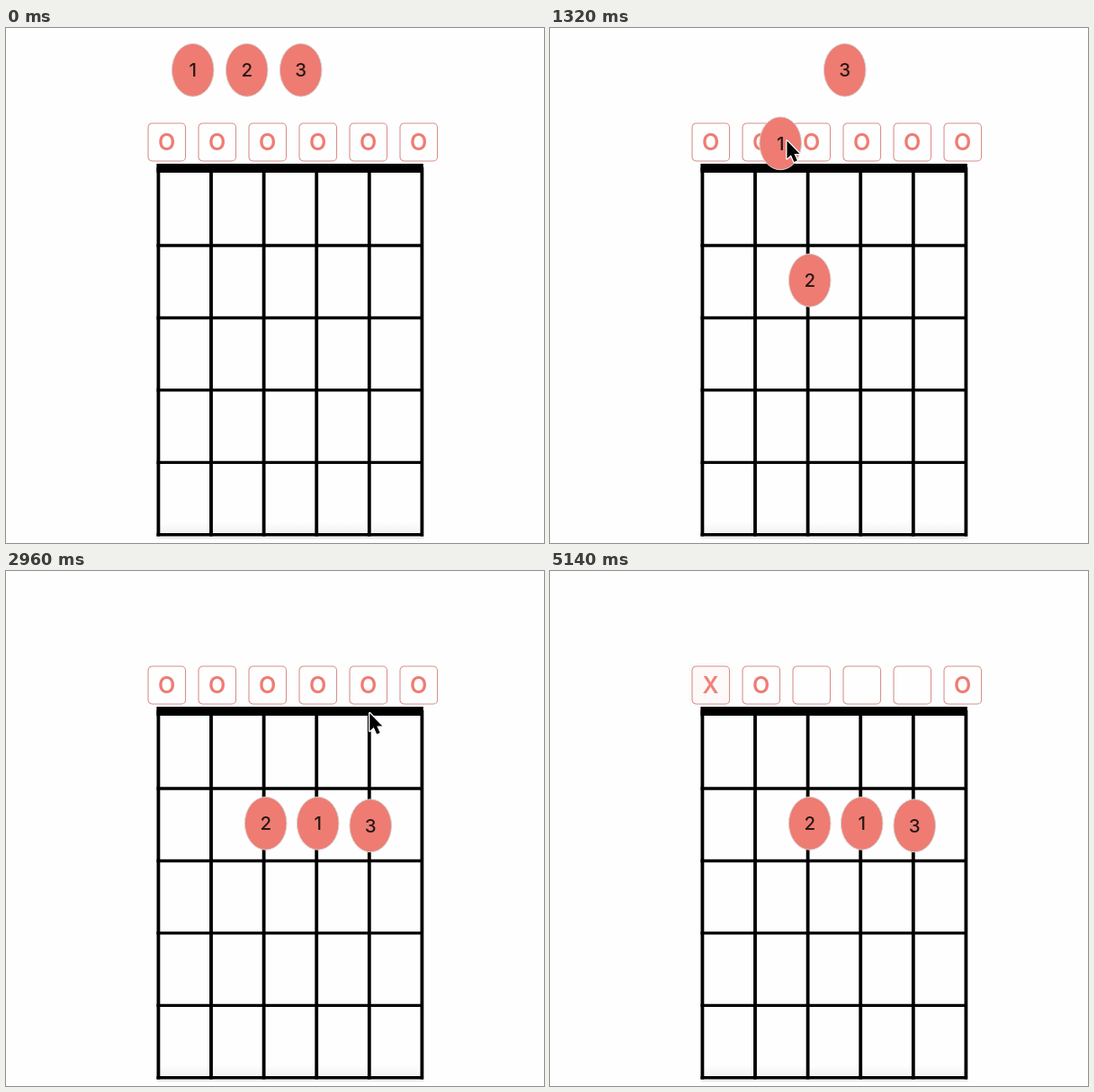
Animation of 598 by 573 pixels, one loop 5.18 s. Source, as an HTML page:

```html
<!DOCTYPE html>
<html lang="en">
<head>
<meta charset="utf-8">
<title>Chord builder</title>
<style>
  html, body { margin: 0; width: 100%; height: 100%; overflow: hidden; background: #fefefe; }
  svg { display: block; width: 598px; height: 573px; }
  text { font-family: Inter, "Liberation Sans", sans-serif; font-weight: 500; text-anchor: middle; }
  .line { stroke: #000; fill: none; }
  .box { stroke: #d8928b; stroke-width: 1.1; }
  .ring { fill: #8fcb9f; }
  .mark { font-size: 25px; font-weight: 600; }
  .dot { fill: #ee7c73; stroke: #d8d0ce; stroke-width: 1; }
  .num { font-size: 20.5px; fill: #2a1817; }
  .arrow { stroke: #fff; stroke-width: 3; stroke-linejoin: round; paint-order: stroke; }
</style>
</head>
<body>
<svg viewBox="0 0 598 573">
  <defs>
    <linearGradient id="shade" x2="0" y2="1">
      <stop stop-color="#fefefe"/><stop offset="1" stop-color="#f1f1f1"/>
    </linearGradient>
  </defs>
  <g id="buttons"></g>
  <rect x="169" y="550" width="293" height="13" fill="url(#shade)"/>
  <path d="M168 567.3H465" stroke="#dcdcdc"/>
  <path id="strings" class="line" stroke-width="3.8"/>
  <path id="frets" class="line" stroke-width="3.4"/>
  <rect x="167.4" y="151" width="296.4" height="10"/>
  <g id="tokens"></g>
  <g id="cursor">
    <g transform="translate(1 2) scale(.86)">
      <path d="M1 2V24L6 19.5L10 28L14 26.3L10.3 18H17Z" opacity=".18"/>
      <path class="arrow" d="M0 0V23L5.2 18.3L9.2 27.2L13.2 25.4L9.3 16.8H16.3Z"/>
    </g>
  </g>
</svg>
<script>
const LOOP = 5180, FADE = 50, BLUR = 5094;
const LABELS = ['O', '', 'X'];
const RED = [238, 124, 115], WHITE = [254, 254, 254];
const TOP = 106, SIZE = 42;

const $ = id => document.getElementById(id);
const clamp = (v, lo, hi) => Math.min(hi, Math.max(lo, v));
const ease = k => (1 - Math.cos(Math.PI * k)) / 2;
const mix = (a, b, k) => `rgb(${a.map((v, i) => Math.round(v + (b[i] - v) * k))})`;
const buttonX = i => 158 + 56 * i;
const tokenX = i => 207.7 + 60 * i;

// The pointer's actions, written one after another
const moves = [], drags = [], clicks = [];
let now = 20, at = [296, -40], target = 0;

function glide(x, y, ms) {
  moves.push({ from: now, ms, a: at, b: at = [x, y] });
  now += ms;
}
function rest(ms) { now += ms; }
function grab(token) { drags[token] = { from: now }; }
function drop(token) { drags[token].to = now; }
function over(button, ms) {
  target = button;
  glide(buttonX(button) + 21, TOP + 24, ms);
}
function tap(ms) {
  clicks.push({ time: now + ms / 2, button: target });
  now += ms;
}

glide(271, 54, 210);
rest(50);
grab(1);
glide(292, 288, 370);
drop(1);
rest(70);

glide(222, 39, 260);
glide(214, 42, 80);
rest(60);
grab(0);
glide(353, 276, 500);
drop(0);
rest(100);

glide(327, 31, 400);
rest(95);
grab(2);
glide(407, 280.5, 200);
rest(45);
glide(404.5, 267.5, 240);
drop(2);
rest(65);

over(4, 275);
tap(260);
over(3, 90);
tap(40);
over(2, 150);
tap(140);
over(0, 160);
tap(100);
tap(100);
glide(215, 640, 170);

function pointer(t) {
  const { from, ms, a, b } = moves.filter(m => m.from <= t).pop() || moves[0];
  const k = ease(clamp((t - from) / ms, 0, 1));
  return a.map((v, i) => v + (b[i] - v) * k);
}

function focused(i, t) {
  const last = clicks.filter(c => c.time <= t).pop();
  return t < BLUR && !!last && last.button === i;
}

function hovered(i, t) {
  if (drags.some(d => t >= d.from && t < d.to)) return false;
  const [x, y] = pointer(t), left = buttonX(i);
  return x > left && x < left + SIZE && y > TOP && y < TOP + SIZE;
}

// Linear fade: share of the recent window in which the state held
function faded(state, i, t) {
  let sum = 0;
  for (let k = 0; k < 25; k++) sum += state(i, t - (k + .5) * FADE / 25);
  return sum / 25;
}

function add(parent, tag, attrs) {
  const el = document.createElementNS('http://www.w3.org/2000/svg', tag);
  for (const name in attrs) el.setAttribute(name, attrs[name]);
  return parent.appendChild(el);
}

function place(el, x, y) {
  el.setAttribute('transform', `translate(${x.toFixed(2)} ${y.toFixed(2)})`);
}

function rule(id, count, line) {
  $(id).setAttribute('d', Array.from({ length: count }, (_, i) => line(i)).join(''));
}
rule('strings', 6, i => `M${169.4 + 58.6 * i} 155V565.6`);
rule('frets', 5, i => `M167.5 ${242 + 80.45 * i}H464`);

const buttons = Array.from({ length: 6 }, (_, i) => {
  const g = add($('buttons'), 'g', {});
  place(g, buttonX(i), TOP);
  return {
    ring: add(g, 'rect', { class: 'ring', x: -4, y: -4, width: 49.5, height: 50, rx: 7 }),
    box: add(g, 'rect', { class: 'box', width: 41.5, height: SIZE, rx: 4.5 }),
    mark: add(g, 'text', { class: 'mark', x: 20.5, y: 29.7 })
  };
});

const tokens = drags.map((d, i) => {
  const g = add($('tokens'), 'g', {});
  add(g, 'ellipse', { class: 'dot', rx: 23.3, ry: 29.4 });
  add(g, 'text', { class: 'num', y: 7.5 }).textContent = i + 1;
  return g;
});

function draw(t) {
  place($('cursor'), ...pointer(t));
  drags.forEach((d, i) => {
    const [x0, y0] = pointer(d.from), [x, y] = pointer(clamp(t, d.from, d.to));
    place(tokens[i], tokenX(i) + x - x0, 46.8 + y - y0);
  });
  buttons.forEach((b, i) => {
    const fill = faded((n, time) => hovered(n, time) || focused(n, time), i, t);
    const count = clicks.filter(c => c.button === i && c.time <= t).length;
    b.ring.setAttribute('opacity', faded(focused, i, t));
    b.box.setAttribute('fill', mix(WHITE, RED, fill));
    b.mark.setAttribute('fill', mix(RED, WHITE, fill));
    b.mark.textContent = LABELS[count % 3];
  });
}

const start = performance.now();
function tick() {
  draw((performance.now() - start) % LOOP);
  requestAnimationFrame(tick);
}
tick();
</script>
</body>
</html>
```
